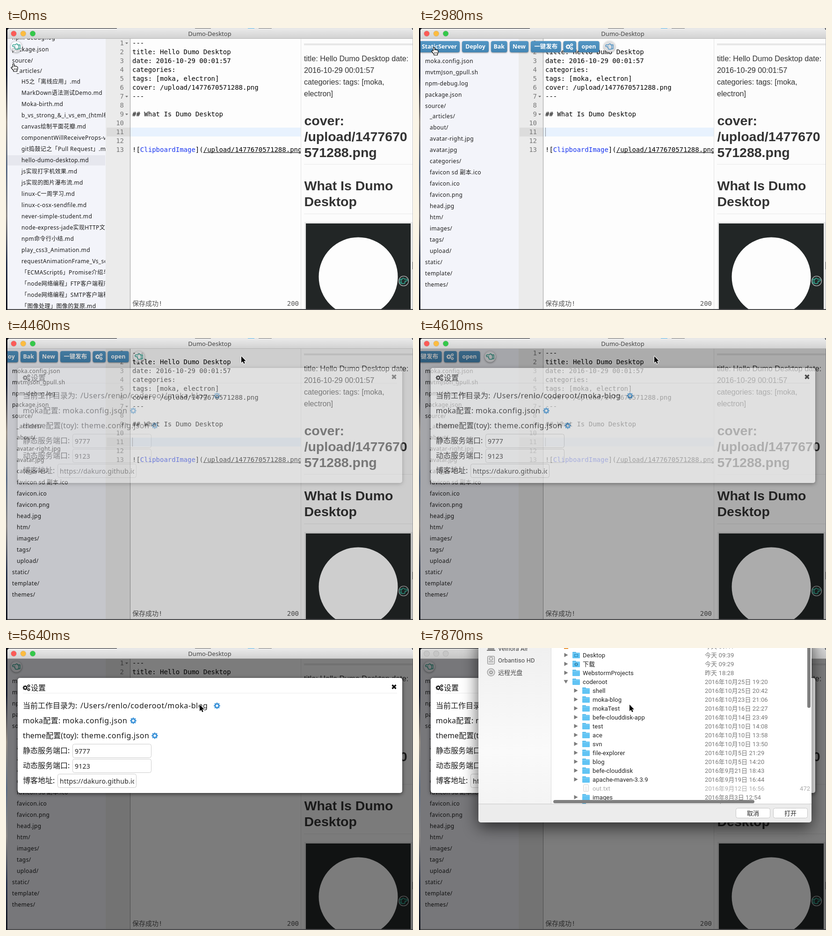
Recreate the animation shown at these times as an HTML page with a canvas. Size 870 by 603 pixels, loop 8 s.

```html
<!DOCTYPE html>
<html lang="zh">
<head>
<meta charset="utf-8">
<title>Dumo-Desktop</title>
<style>
html, body { margin: 0; width: 870px; height: 603px; overflow: hidden; background: #fff; }
canvas { display: block; }
</style>
</head>
<body>
<canvas id="stage" width="870" height="603"></canvas>
<script>
const page = document.getElementById('stage').getContext('2d');
const layer = document.createElement('canvas').getContext('2d');
layer.canvas.width = 870;
layer.canvas.height = 603;
let c = page;
const CJK = '"Noto Sans CJK SC","Noto Sans CJK",sans-serif';
const UI = '"Noto Sans",' + CJK;
const MONO = '"DejaVu Sans Mono","Noto Sans CJK SC","Noto Sans CJK",monospace';
const DOC = '"Liberation Sans",' + CJK;
const SYS = 'Roboto,' + CJK;
const LOOP = 8000, BEAT = 148.4;
const TEAL = '#2f9f8c', BLUE = '#3d93d8';

// ---- helpers ----
function put(s, x, mid, size, color, o = {}) {
  c.font = `${o.weight || 400} ${size}px ${o.font || UI}`;
  c.letterSpacing = (o.gap || 0) + 'px';
  c.textAlign = o.align || 'left';
  c.fillStyle = color;
  c.fillText(s, x, Math.round(mid + size * 0.35));
}
function rect(x, y, w, h, color) {
  c.fillStyle = color;
  c.fillRect(x, y, w, h);
}
function box(x, y, w, h, r, fill, line) {
  c.beginPath();
  c.roundRect(x, y, w, h, r);
  c.fillStyle = fill;
  c.fill();
  if (line) { noShadow(); c.strokeStyle = line; c.lineWidth = 1; c.stroke(); }
}
function disc(x, y, r, fill) {
  c.beginPath();
  c.arc(x, y, r, 0, 7);
  c.fillStyle = fill;
  c.fill();
}
function shadow(color, blur, dy) {
  c.shadowColor = color; c.shadowBlur = blur; c.shadowOffsetY = dy;
}
function noShadow() { shadow('transparent', 0, 0); }
function fade(x0, y0, x1, y1, ...stops) {
  const g = c.createLinearGradient(x0, y0, x1, y1);
  stops.forEach((s, i) => g.addColorStop(i / (stops.length - 1), s));
  return g;
}
function clipped(x, y, w, h, draw) {
  c.save();
  c.beginPath();
  c.rect(x, y, w, h);
  c.clip();
  draw();
  c.restore();
}
// shadow only outside the box, as CSS draws it
function halo(x, y, w, h, r, color, blur, dy) {
  c.save();
  c.beginPath();
  c.rect(0, 0, 870, 603);
  c.roundRect(x, y, w, h, r);
  c.clip('evenodd');
  shadow(color, blur, dy);
  box(x, y, w, h, r, '#fff');
  c.restore();
}
// keys: [beat, value, value...] rows, linear between rows
function at(keys, b) {
  const i = keys.findIndex(k => k[0] > b);
  if (i < 0) return keys[keys.length - 1].slice(1);
  if (i === 0) return keys[0].slice(1);
  const p = keys[i - 1], q = keys[i], f = (b - p[0]) / (q[0] - p[0]);
  return p.slice(1).map((v, n) => v + (q[n + 1] - v) * f);
}

// ---- icons ----
function gear(x, y, r, color, teeth = 8) {
  c.beginPath();
  for (let i = 0; i < teeth * 4; i++) {
    const a = (i - 0.5) / (teeth * 4) * Math.PI * 2, d = i % 4 < 2 ? r : r * 0.76;
    c.lineTo(x + d * Math.cos(a), y + d * Math.sin(a));
  }
  c.closePath();
  c.moveTo(x + r * 0.36, y);
  c.arc(x, y, r * 0.36, 0, 7);
  c.fillStyle = color;
  c.fill('evenodd');
}
function cogs(x, y, color) {
  gear(x - 2.5, y, 5.4, color);
  gear(x + 5, y - 4, 3.3, color, 6);
  gear(x + 5, y + 4, 3.3, color, 6);
}
const PALM = new Path2D('M-8-2Q-8-4-6-4H-2Q0-7 2-6Q3-5 2.5-4H8V4.5H5L3 5.5H-1Q-3 5-2.5 3Q-4 2-3 0H-6Q-8 0-8-2ZM5-4V4.5');
function palm(x, y, color, flip) {
  c.save();
  c.translate(x, y);
  c.scale(flip ? -1 : 1, 1);
  c.strokeStyle = color;
  c.lineWidth = 1.4;
  c.lineJoin = 'round';
  c.stroke(PALM);
  c.restore();
}
const ARROW = new Path2D('M0 0V14L3.2 11L5.4 16L7.7 15L5.5 10.2H9.8Z');
const HAND = new Path2D('M-1.5 8V1Q0-1 1.5 1V6Q3 4.5 4.5 6Q6 5 7 6.5Q9 6.5 9 8.5V11Q9 13 7.5 14.5V17H0V15L-5 9Q-5 7-3 7.5Z');
function pointer(x, y, hand) {
  c.save();
  c.translate(x, y);
  c.lineJoin = 'round';
  if (hand) {
    c.fillStyle = '#fff';
    c.fill(HAND);
    c.strokeStyle = '#000';
    c.lineWidth = 1.2;
    c.stroke(HAND);
    c.beginPath();
    [2, 4.5, 7].forEach(n => { c.moveTo(n - 0.5, 10); c.lineTo(n - 0.5, 14); });
    c.lineWidth = 0.8;
    c.stroke();
  } else {
    c.strokeStyle = '#fff';
    c.lineWidth = 2;
    c.stroke(ARROW);
    c.fillStyle = '#000';
    c.fill(ARROW);
  }
  c.restore();
}

// ---- content ----
const ROOT = 'moka.config.json|mvtmJson_gpull.sh|npm-debug.log|package.json|source/'.split('|');
const TAIL = 'static/|template/|themes/'.split('|');
const SOURCE = '_articles/|about/|avatar-right.jpg|avatar.jpg|categories/|favicon sd 副本.ico|favicon.ico|favicon.png|head.jpg|htm/|images/|tags/|upload/'.split('|');
const POSTS = ('H5之「离线应用」.md|MarkDown语法测试Demo.md|Moka-birth.md|b_vs_strong_&_i_vs_em_(html标签).md|canvas绘制平面花瓣.md|' +
  'componentWillReceiveProps-vs.md|git捣鼓记之「Pull Request」.md|hello-dumo-desktop.md|js实现打字机效果.md|js实现的图片瀑布流.md|' +
  'linux-C一周学习.md|linux-c-osx-sendfile.md|never-simple-student.md|node-express-jade实现HTTP文件.md|npm命令行小结.md|' +
  'play_css3_Animation.md|requestAnimationFrame_Vs_setTimeout.md|「ECMAScript6」Promise介绍与实现.md|「node网络编程」FTP客户端程序.md|' +
  '「node网络编程」SMTP客户端程序.md|「图像处理」图像的复原.md').split('|');
const CODE = ['---', 'title: Hello Dumo Desktop', 'date: 2016-10-29 00:01:57', 'categories:', 'tags: [moka, electron]',
  'cover: /upload/1477670571288.png', '---', '', '## What Is Dumo Desktop', '', '', '', ''];
const FILES = ['Desktop|今天 09:39', '下载|今天 09:29', 'WebstormProjects|昨天 18:28', 'coderoot|2016年10月25日 19:20',
  'shell|2016年10月25日 20:42', 'moka-blog|2016年10月23日 21:06', 'mokaTest|2016年10月16日 22:27',
  'befe-clouddisk-app|2016年10月14日 23:49', 'test|2016年10月10日 14:08', 'ace|2016年10月10日 13:58',
  'svn|2016年10月10日 13:50', 'file-explorer|2016年10月5日 21:29', 'blog|2016年10月5日 14:20',
  'befe-clouddisk|2016年9月21日 18:43', 'apache-maven-3.3.9|2016年9月19日 16:44', 'out.txt|2016年9月12日 16:56',
  'images|2016年8月3日 12:54', 'docs|2016年8月2日 10:31'];
const BUTTONS = [['StaticServer', 0, 87], ['Deploy', 92, 149], ['Bak', 154, 188.5], ['New', 194, 234],
  ['一键发布', 239, 303.5], ['', 308.5, 336], ['open', 340.5, 385.5]];

// ---- motion ----
const MOUSE = [[0, 16, 76], [1, 17, 77], [4, 17, 77], [5, 21, 92], [6, 28, 128], [7, 36, 164], [8, 37, 173], [10, 37, 171],
  [12, 37, 171], [17, 22, 38], [18, 22, 38], [20, 32, 41], [21, 90, 50], [22, 200, 53], [23, 318, 44], [24, 440, 48],
  [25, 588, 50], [26, 497, 42], [27, 503, 39], [32, 503, 39], [36, 345, 118], [39, 449, 122], [40, 451, 122],
  [47, 451, 122], [48, 450, 121]];
const BAR = [[18, -385], [19, -110], [20, 0], [21, 3], [28, 3], [29, -20], [30, -123], [31, -255], [32, -348], [33, -378], [34, -385]];
const SHOW = [[28, 0], [29, 0.08], [30, 0.37], [31, 0.63], [32, 0.84], [33, 0.95], [34, 1]];

// ---- parts ----
function chrome(active) {
  rect(0, 0, 870, 603, fade(0, 0, 0, 603, '#080b14', '#11182a', '#9a9288', '#5c6c84', '#8d8a88', '#27324a', '#10131c'));
  rect(0, 0, 237, 1, '#0c0e14');
  rect(237, 0, 633, 1, '#e4e4e4');
  rect(404, 0, 34, 1, '#666');
  rect(517, 0, 14, 1, '#58b8ee');
  rect(540, 0, 28, 1, '#777');
  rect(3, 601, 867, 2, '#4a4a4c');
  c.beginPath();
  c.roundRect(3, 1, 867, 600, [5, 5, 4, 4]);
  c.save();
  c.clip();
  rect(3, 1, 867, 600, '#fdfdfd');
  rect(3, 1, 867, 22, active ? fade(0, 1, 0, 22, '#eaeaea', '#d2d2d2') : fade(0, 1, 0, 22, '#d8d8d8', '#c6c6c6'));
  rect(3, 22, 867, 1, '#b4b4b4');
  ['#fc5b57', '#fdbc40', '#34c84a'].forEach((k, i) => {
    disc(16.5 + 20.3 * i, 12, 6.2, active ? 'rgba(0,0,0,.18)' : '#a8a8a8');
    disc(16.5 + 20.3 * i, 12, 5.7, active ? k : '#c6c6c6');
  });
  put('Dumo-Desktop', 435.5, 12.5, 13, '#444', { align: 'center' });
  c.restore();
}
function row(s, x, y) { put(s, x, y, 12, '#1a1a1a', { gap: 0.4 }); }
function sidebar(b) {
  rect(3, 23, 210, 578, '#f3f4fa');
  clipped(3, 23, 209, 578, () => {
    if (b < 3) {
      rect(3, 272, 210, 22, '#e6e7ee');
      row('npm-debug.log', 13, 21);
      row('package.json', 13, 46);
      row('source/', 13, 70);
      row('_articles/', 23, 92);
      POSTS.forEach((s, i) => row(s, 33, 115 + 24 * i));
      return;
    }
    const open = b >= 12;
    ROOT.forEach((s, i) => row(s, 13, 71 + 24 * i));
    if (open) SOURCE.forEach((s, i) => row(s, 23, 189 + 24 * i));
    TAIL.forEach((s, i) => row(s, 13, (open ? 501 : 191) + 24 * i));
  });
}
function editor(b) {
  rect(213, 23, 52, 578, '#ebebeb');
  rect(215, 213, 50, 19, '#dcdcdc');
  rect(265, 23, 1, 578, '#9c9c9c');
  rect(266, 213, 364, 19, '#e8f2fe');
  clipped(213, 23, 417, 578, () => {
    CODE.forEach((s, i) => {
      const y = 32 + 19 * i;
      put(i + 1, 252, y, 14, '#777', { font: MONO, align: 'right' });
      put(s, 270, y, 14, '#000', { font: MONO });
    });
    c.fillStyle = '#777';
    [0, 6, 8].forEach(i => {
      const y = 31 + 19 * i;
      c.beginPath();
      c.moveTo(255, y); c.lineTo(261, y); c.lineTo(258, y + 3.5);
      c.fill();
    });
    const w = 14 * 0.602, x = n => 270 + w * n, o = { font: MONO };
    put('![', x(0), 260, 14, '#000', o);
    put('ClipboardImage', x(2), 260, 14, '#1a36f0', o);
    put('](', x(16), 260, 14, '#000', o);
    put('/upload/1477670571288.png)', x(18), 260, 14, '#000', o);
    rect(x(18), 266, 212, 1, '#000');
    put(b >= 3 && b < 10 ? '自动保存中...' : '保存成功!', 270, 589, 14, '#555', o);
    put('200', 626, 589, 14, '#555', { font: MONO, align: 'right' });
  });
  if (b >= 1) rect(270, 213, 1, 19, '#8a8f96');
}
function preview() {
  rect(630, 23, 240, 578, '#fcfcfc');
  rect(630, 23, 1, 578, '#e2e2e2');
  rect(637, 33, 233, 4, '#e7e7e7');
  ['title: Hello Dumo Desktop date:', '2016-10-29 00:01:57', 'categories: tags: [moka,', 'electron]']
    .forEach((s, i) => put(s, 637, 65 + 25 * i, 16.2, '#333', { font: DOC }));
  [['cover:', 198], ['/upload/1477670', 232], ['571288.png', 266], ['What Is Dumo', 337], ['Desktop', 371]]
    .forEach(([s, y]) => put(s, 637.5, y, 28.5, '#333', { font: DOC, weight: 700 }));
  rect(637, 291, 233, 1, '#e9e9e9');
  rect(637, 397, 233, 1, '#e9e9e9');
  rect(638, 415, 231, 186, '#e9e9e9');
  rect(641, 418, 224, 183, '#222626');
  clipped(641, 418, 224, 183, () => disc(753, 532, 84.5, '#fdfdfd'));
  disc(850, 541, 11, '#d0d4d4');
  disc(850, 541, 10, '#242929');
  palm(850, 541, '#35b59d', true);
  rect(869, 23, 1, 578, '#c4c4c6');
  rect(869, 500, 1, 16, '#555');
}
function toolbar(b) {
  const [dx] = at(BAR, b);
  clipped(3, 23, 866, 40, () => {
    for (const [s, l, r] of BUTTONS) {
      if (r + dx < 4) continue;
      shadow('rgba(0,0,0,.45)', 3, 1);
      box(l + dx, 28, r - l, 24, 4, fade(0, 28, 0, 52, '#5396c4', '#4486b4'));
      noShadow();
      const mid = s === 'StaticServer' ? 43.5 : (l + r) / 2;
      if (s) put(s, mid + dx, 40, 12.4, '#fff', { weight: 700, align: 'center' });
      else cogs(mid + dx - 1, 40, '#fff');
    }
    const x = 407 + dx, lit = b >= 16 && b < 23;
    halo(x - 11.5, 28.5, 23, 23, 11.5, 'rgba(0,0,0,.5)', 4, 1);
    disc(x, 40, 11.5, lit ? '#dcdddf' : 'rgba(250,250,252,.6)');
    palm(x, 40, lit ? '#4a8fc2' : TEAL);
  });
}
function field(s, x, y) {
  box(x + 0.5, y - 13.5, 168, 29, 4, '#fff', '#ccc');
  clipped(x + 5, y - 13, 159, 28, () => put(s, x + 5, y + 2, 14, '#222', { gap: 0.25 }));
}
function panel() {
  box(25, 64, 822, 246, 5, '#fff');
  cogs(43.5, 85, '#111');
  put('设置', 53, 85, 16, '#111');
  rect(36, 96, 800, 1, '#ebebeb');
  c.beginPath();
  c.moveTo(825.5, 79); c.lineTo(833.5, 87);
  c.moveTo(833.5, 79); c.lineTo(825.5, 87);
  c.strokeStyle = '#111';
  c.lineWidth = 3.2;
  c.stroke();
  const t = (s, x, y, gap = 0) => put(s, x, y, 16, '#1a1a1a', { gap });
  t('当前工作目录为:', 36, 123);
  t('/Users/renlo/coderoot/moka-blog', 159, 123, 0.6);
  t('moka配置:', 36, 155, 0.3);
  t('moka.config.json', 121, 155, 0.6);
  t('theme配置(toy):', 36, 187, 0.1);
  t('theme.config.json', 161, 187, 0.6);
  gear(451, 123.5, 7, BLUE);
  gear(272, 155.5, 7, BLUE);
  gear(318, 187.5, 7, BLUE);
  t('静态服务端口:', 36, 219);
  t('动态服务端口:', 36, 251);
  t('博客地址:', 36, 283);
  field('9777', 142, 219);
  field('9123', 142, 251);
  field('https://dakuro.github.io', 110, 283);
}
// the panel fades as one flat picture
function settings(k) {
  rect(3, 23, 867, 578, `rgba(0,0,0,${0.51 * k})`);
  c = layer;
  c.clearRect(0, 0, 870, 603);
  panel();
  c = page;
  c.globalAlpha = k;
  halo(25, 64, 822, 246, 5, 'rgba(0,0,0,.6)', 9, 2);
  c.drawImage(layer.canvas, 0, 0);
  c.globalAlpha = 1;
}
function folder(x, y) {
  box(x - 8, y - 6.5, 8, 5, 1, '#48b0e4');
  box(x - 8, y - 5, 16, 12, 1, '#62c4f4');
  rect(x - 8, y - 3.5, 16, 1, '#8ad6fa');
}
function twist(x, y, open) {
  c.beginPath();
  if (open) { c.moveTo(x - 4.5, y - 3.5); c.lineTo(x + 4.5, y - 3.5); c.lineTo(x, y + 4); }
  else { c.moveTo(x - 3.5, y - 4.5); c.lineTo(x + 4.5, y); c.lineTo(x - 3.5, y + 4.5); }
  c.fillStyle = '#7c7c7c';
  c.fill();
}
function drive(y) {
  box(146.5, y - 8.5, 15, 17, 2, '#e2e2e2', '#808080');
  rect(149, y + 3, 10, 1, '#808080');
  c.beginPath();
  c.arc(154, y - 3, 3.5, 0, 7);
  c.stroke();
}
function chooser(bars) {
  shadow('rgba(0,0,0,.65)', 34, 10);
  box(127, -40, 712, 413, 5, '#ececec');
  noShadow();
  rect(127, 0, 156, 333, fade(0, 0, 0, 333, '#f0f0f0', '#f5f5f5', '#fafafa', '#f4f4f4'));
  rect(283, 0, 556, 333, '#fff');
  rect(282, 0, 1, 333, '#dcdcdc');
  const o = { font: SYS, gap: 0.1 };
  rect(147, 0, 14, 4, '#9a9a9a');
  rect(145, 4, 18, 2, '#777');
  put('Velnora Air', 169, 1, 13, '#444', o);
  drive(26);
  put('Orbantiso HD', 169, 26, 13, '#444', o);
  disc(154, 52, 8.5, '#888');
  disc(154, 52, 7.5, '#dcdcdc');
  disc(154, 52, 3.5, '#888');
  disc(154, 52, 1.8, '#fff');
  put('远程光盘', 169, 52, 13, '#444', o);
  clipped(283, 0, 556, 333, () => {
    rect(310, 0, 9, 2, '#e8953a');
    put('今天 09:41', 611, -4, 13, '#777', o);
    FILES.forEach((f, i) => {
      const [name, date] = f.split('|'), y = 15 + 19 * i, x = i < 4 ? 336 : 357;
      const off = name === 'out.txt';
      if (off) {
        box(x - 5.5, y - 7.5, 11, 14, 1, '#fdfdfd', '#cfcfcf');
        for (let n = -3; n < 5; n += 3) rect(x - 3, y + n, 6, 1, '#ddd');
        put('472', 836, y, 13, '#aaa', { font: SYS, align: 'right' });
      } else {
        twist(x - 22, y, i === 3);
        folder(x, y);
        if (i === 0) { c.strokeStyle = '#2786b4'; c.lineWidth = 1; c.strokeRect(x - 3.5, y - 1.5, 7, 5); }
        if (i === 1) { disc(x, y + 1, 3.5, '#2786b4'); rect(x - 0.5, y - 1, 1, 4, '#fff'); }
      }
      put(name, x + 14, y, 13, off ? '#aaa' : '#222', o);
      put(date, 611, y, 13, off ? '#aaa' : '#777', o);
    });
    c.globalAlpha = bars;
    box(830, -60, 7, 188, 3.5, '#808080');
    box(287, 325, 430, 7, 3.5, '#808080');
    c.globalAlpha = 1;
  });
  rect(127, 333, 712, 1, '#c9c9c9');
  [['取消', 677], ['打开', 757]].forEach(([s, x]) => {
    box(x + 0.5, 342.5, 73, 21, 4, '#fff', '#c6c6c6');
    put(s, x + 37, 353, 13, '#222', { font: SYS, align: 'center' });
  });
}

function draw(b) {
  const picking = b >= 50;
  chrome(!picking);
  sidebar(b);
  editor(b);
  preview();
  toolbar(b);
  const [k] = at(SHOW, b);
  if (k > 0) settings(k);
  if (picking) chooser(b < 52 ? 0 : b < 53 ? 0.5 : 1);
  const [x, y] = at(MOUSE, b);
  pointer(Math.round(x), Math.round(y), b <= 23 || (b >= 39 && b < 48));
}

let start = null, last = -1;
function tick(now) {
  if (start === null) start = now;
  const b = Math.floor(((now - start) % LOOP + 8) / BEAT);
  if (b !== last) draw(last = b);
  requestAnimationFrame(tick);
}
requestAnimationFrame(tick);
</script>
</body>
</html>
```
